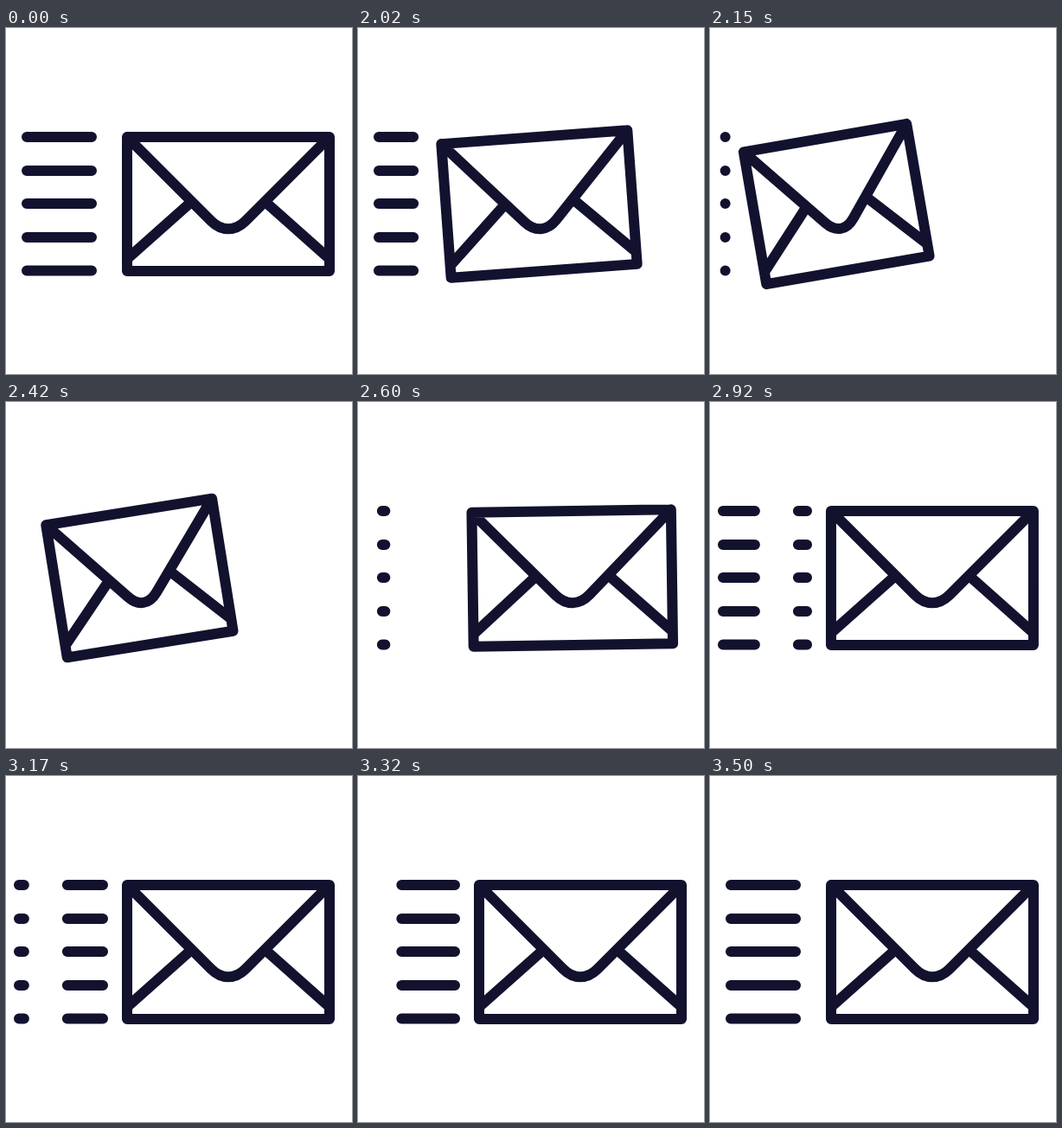
Write an HTML page that moves like this. It is 400x400 px and loops after 3.52 s.

```html
<!DOCTYPE html>
<html lang="en">
<head>
<meta charset="utf-8">
<title>Sending mail</title>
<style>
  html, body { margin: 0; width: 100%; height: 100%; overflow: hidden; background: #fff; }
  svg { display: block; width: 100%; height: 100%; }
  path {
    fill: none; stroke: #12122f; stroke-width: 12; stroke-linecap: round; stroke-linejoin: round;
    vector-effect: non-scaling-stroke;
  }
</style>
</head>
<body>
<svg viewBox="0 0 400 400">
  <path id="trails"/>
  <g id="envelope">
    <path d="M-117-77.5H117V77.5H-117ZL-20 19.5C-7.6 31.9 7.6 31.9 20 19.5L117-77.5M-117 63.5L-45-.5M117 63.5L45-.5"/>
  </g>
</svg>
<script>
const LOOP = 3520, START = 2020, END = 3500, SNAP = 2487;
const ROWS = [126, 165, 203, 242, 280.5];
const LEFT = 15, RIGHT = 112, DASH = 75, GAP = 50;
const trails = document.getElementById('trails');
const envelope = document.getElementById('envelope');

// How far the envelope is drawn back: 0 at rest, 1 fully pulled.
function pullAt(t) {
  if (t < START || t >= END) return 0;
  const rise = 1 - Math.exp(-(t - 2000) / 38.5);
  const release = t < SNAP
    ? 1 - 0.5 * Math.exp((t - SNAP) / 39)
    : 0.5 * Math.exp((SNAP - t) / 63);
  return rise * release;
}

// Visible [from, to] spans of each speed line.
function spansAt(t) {
  if (t < START || t >= END) return [[24, 99]];
  if (t < 2590) {
    const end = 99 - 83 * pullAt(t);
    return t < 2200 ? [[Math.min(24, end), end]] : [];
  }
  const left = END - t;
  const head = 24 + 0.1528 * left - 3.16e-5 * left * left;
  const grown = 31 + (t - 2600) * 0.35;
  const from = Math.max(LEFT, 28 - (t - 2600) * 0.13);
  return [
    [from, Math.min(head - GAP, grown)],
    [Math.max(LEFT, head), Math.min(RIGHT, head + DASH)]
  ].filter(([a, b]) => b >= a);
}

function draw(now) {
  const t = now % LOOP, pull = pullAt(t);
  envelope.setAttribute('transform',
    `translate(${257 - 113 * pull} 203.5) rotate(${-10 * pull}) scale(${1 - 0.187 * pull} 1)`);
  trails.setAttribute('d', spansAt(t).map(([a, b]) =>
    ROWS.map(y => `M${a} ${y}H${b + 0.01}`).join('')).join(''));
}

const begin = performance.now();
function tick() {
  draw(performance.now() - begin);
  requestAnimationFrame(tick);
}
tick();
</script>
</body>
</html>
```
